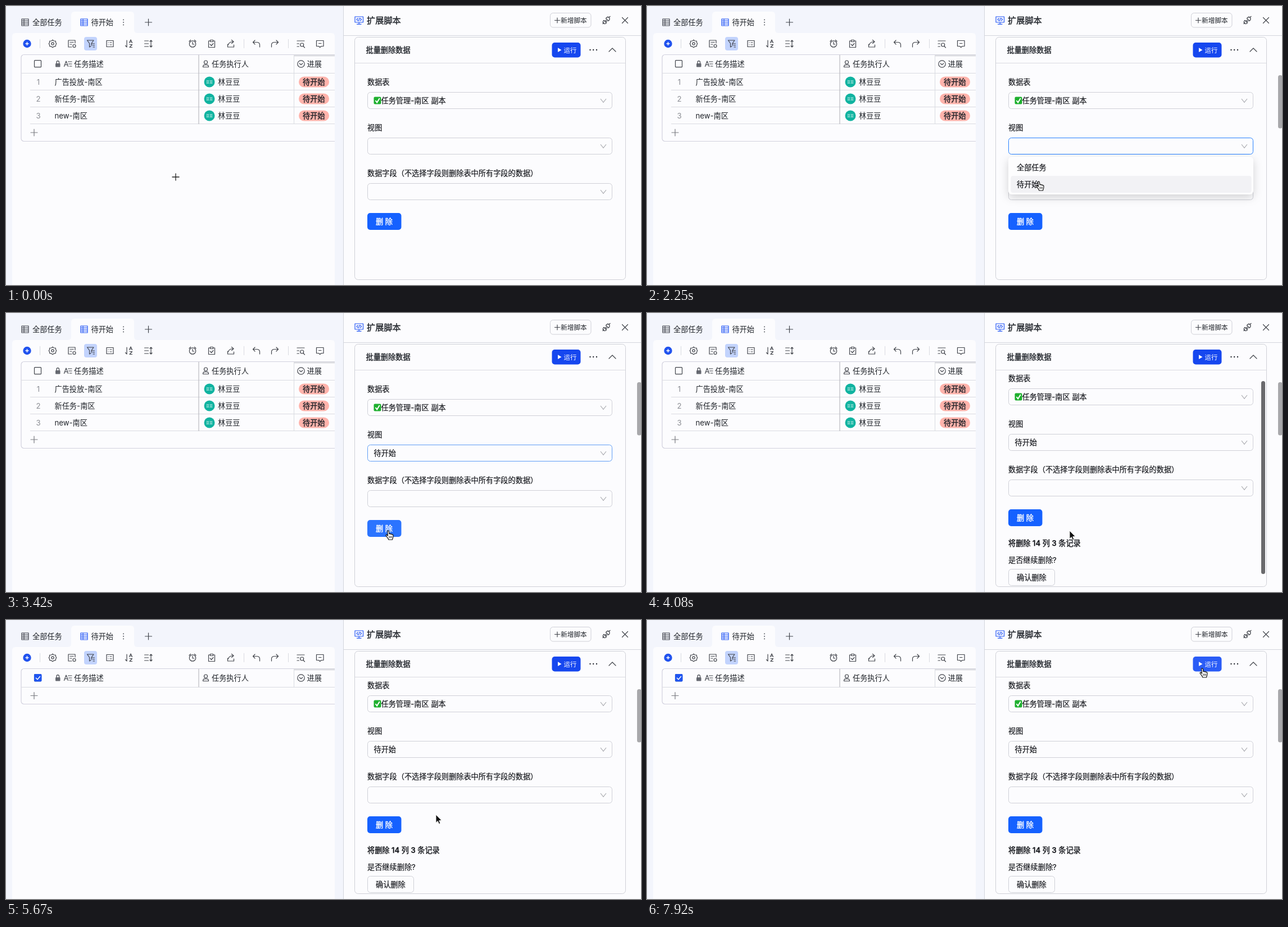
Write an HTML page that moves like this. It is 1130 px wide and 496 px high and loops after 8 s.

```html
<!DOCTYPE html>
<html lang="zh-CN">
<head>
<meta charset="utf-8">
<title>批量删除数据</title>
<style>
html, body { margin: 0; width: 100%; height: 100%; overflow: hidden; background: #f3f5fc; }
svg { display: block; }
text { font: 13.2px Inter, "Noto Sans CJK SC", "Noto Sans CJK JP", sans-serif; color: #1f2329; fill: currentColor; }
#form text, #menu text { color: #15171c; stroke: currentColor; stroke-width: .2; }
text.mid, #form text.mid { font-weight: 500; stroke: currentColor; stroke-width: .4; }
text.num { color: #8a8c93; text-anchor: middle; }
text.white, #form text.white { color: #fff; }
.icon { fill: none; stroke: #41444b; stroke-width: 1.2; stroke-linecap: round; stroke-linejoin: round; }
.blue { stroke: #2457f5; }
.line { fill: none; stroke: #dadbe1; }
.page { fill: #fcfcfe; }
.box { fill: #fcfcfe; stroke: #cfd0d7; }
.arrow { fill: none; stroke: #a6a7ad; stroke-width: 1.1; }
#menu { transform-origin: 861px 268px; filter: drop-shadow(0 5px 8px rgba(0,0,0,.17)); }
</style>
</head>
<body>
<svg width="1130" height="496" viewBox="0 0 1130 496">
  <defs>
    <clipPath id="bodyClip"><rect x="621" y="102" width="480" height="384"/></clipPath>
    <clipPath id="gridClip"><rect x="20" y="80" width="565" height="180"/></clipPath>
    <g id="sheet"><path d="M0 0H12V12H0ZM0 3H12M0 6H12M0 9H12M4 0V12"/></g>
    <g id="plus"><path d="M-6 0H6M0-6V6"/></g>
    <path id="down" d="M-5-3L0 3.4 5-3"/>
  </defs>

  <!-- left pane -->
  <rect width="600" height="496" fill="#f3f5fc"/>
  <path class="page" d="M11 496V54Q11 48 17 48H110Q116 48 116 42V16Q116 10 122 10H222Q228 10 228 16V42Q228 48 234 48H579Q585 48 585 54V496Z"/>
  <use href="#sheet" x="28" y="23" class="icon"/>
  <text x="47" y="34">全部任务</text>
  <use href="#sheet" x="133" y="23" class="icon blue"/>
  <text x="151.500" y="34">待开始</text>
  <g fill="#555860"><circle cx="209" cy="24.500" r="1"/><circle cx="209" cy="29" r="1"/><circle cx="209" cy="33.500" r="1"/></g>
  <use href="#plus" x="253.500" y="29" class="icon"/>

  <circle cx="37.500" cy="67" r="7.200" fill="#2052ee"/>
  <path d="M34.500 67H40.500M37.500 64V70" stroke="#fff" stroke-width="1.400"/>
  <path class="line" d="M60.500 59V75M423.500 59V75M502.500 59V75"/>
  <rect x="139" y="55" width="23" height="24" rx="4" fill="#c2d3fd"/>
  <g class="icon">
    <path d="M83 60.300L85 62 88.300 62.400 88.600 65.300 89.800 67 88.600 68.800 88.300 71.700 85 72.200 83 73.700 81 72.200 77.700 71.700 77.400 68.800 76.200 67 77.400 65.300 77.700 62.400 81 62Z"/>
    <circle cx="83" cy="67" r="2.200"/>
    <path d="M123 66V61H111V73H117M114 64.500H120M114 68H117"/><circle cx="121.500" cy="71" r="2.500"/>
    <path d="M144.500 61H156L152 66.500V70M144.500 61L148.500 66.500V73L151 71.500M153 67H157.500M154 70H157.500M155 73H157.500"/>
    <path d="M179 61.500H191V72.500H179ZM182 65H182.300M185 65H188M182 69H182.300M185 69H188"/>
    <path d="M215 61V73L212.500 70.500M219.500 65.500L222 60 224.500 65.500M220.300 64H223.700M220 68.500H224.500L220 73.500H224.500"/>
    <path d="M246.500 62H253.500M246.500 67H253.500M246.500 72H253.500M258 61V73M256 63L258 61 260 63M256 71L258 73 260 71"/>
    <circle cx="332" cy="67.500" r="5.700"/><path d="M332 64V68H335M326 63L328.500 60.500M338 63L335.500 60.500"/>
    <path d="M363 62H360.500V73.500H371.500V62H369M363.500 60.500H368.500V63.500H363.500ZM363 68L365.500 70.500 369 66.500"/>
    <path d="M394.500 68V73H405.500V69M395.500 69Q397 63.500 404.500 63.500M401.500 60.500L405 63.500 401.500 66.500"/>
    <path d="M443 61L439.500 64.500 443 68M440 64.500H447Q451.500 65 451.500 69V73"/>
    <path d="M481 61L484.500 64.500 481 68M484 64.500H477Q472.500 65 472.500 69V73"/>
    <path d="M518 62H531M518 67H521.500M518 72H521.500M529 71.500L531.500 74"/><circle cx="526.700" cy="69" r="3"/>
    <path d="M552.500 61.500H565V71.500H561L558.700 73.500 556.500 71.500H552.500ZM556.500 66.500H561"/>
  </g>

  <!-- grid -->
  <g clip-path="url(#gridClip)">
    <rect id="frame" x="27" y="86.500" width="580" height="154" rx="5" fill="#fcfcfe" stroke="#d2d1de" stroke-width="1.200"/>
    <path class="line" d="M27 119.500H585M512.500 87V119"/>
    <path d="M512 88H585" stroke="#dcdde1" stroke-width="3"/>
    <g id="rows"></g>
    <path id="freeze" d="M343 87V210" stroke="#b9babf" stroke-width="1.200"/>
    <use id="add" href="#plus" x="50" y="225" class="icon" stroke-opacity=".7"/>
    <rect x="50.500" y="96.700" width="12" height="12" rx="1" class="icon"/>
    <g id="checked"><rect x="50" y="96" width="13.500" height="13.500" rx="2" fill="#1f55f0"/><path d="M53 102.800L56 105.700 60.800 100" fill="none" stroke="#fff" stroke-width="1.500"/></g>
    <rect x="88" y="102" width="8.500" height="6.500" rx="1" fill="#666971"/>
    <path class="icon" d="M90 102V100Q90 97.700 92.200 97.700T94.500 100V102M103.500 107.500L107 98 110.500 107.500M105 104.500H109M110.500 99H117M111.500 103H117M113 107H117"/>
    <text x="121" y="108">任务描述</text>
    <g class="icon"><circle cx="355.500" cy="100" r="3"/><path d="M350.500 108.500Q350.500 104.700 354 104.700H357Q360.500 104.700 360.500 108.500Z"/><circle cx="525" cy="103" r="6.200"/><path d="M522.300 102L525 104.700 527.700 102"/></g>
    <text x="366" y="108">任务执行人</text>
    <text x="535.500" y="108">进展</text>
  </g>

  <!-- right pane -->
  <rect class="page" x="600" width="530" height="496"/>
  <path d="M600.500 0V496M601 52.500H1130" stroke="#d3d5dd"/>
  <path id="split" d="M602 0V496" stroke="#3370ff" stroke-width="2"/>
  <path class="icon blue" stroke-width="1.500" d="M621 19H635.500V29H621ZM628.200 29V32M624.500 32.300H632M626 22L624 24 626 26M630.500 22L632.500 24 630.500 26M629 21.500L627.600 26.500"/>
  <text x="642" y="31.200" class="mid" style="font-size:15.200px">扩展脚本</text>
  <rect class="box" x="968.500" y="12.500" width="72.500" height="25.500" rx="5"/>
  <path class="icon" d="M976.500 25.500H985.500M981 21V30"/>
  <text x="987" y="30" style="font-size:11.700px">新增脚本</text>
  <path class="icon" d="M1062 31.500L1064 29.500M1064 25.500L1068.500 30 1066.500 31.500Q1064.500 32 1063 30.300T1062.700 27ZM1067.500 22L1072 26.500 1073.500 25Q1075 22.500 1073 20.500T1069 20.500ZM1073 20.500L1075 18.500M1066 27L1068 25M1067.500 28.500L1069.500 26.500"/>
  <path class="icon" stroke-width="1.400" d="M1096.500 20.500L1106.500 30.500M1106.500 20.500L1096.500 30.500"/>

  <rect class="box" x="620.500" y="55.500" width="482" height="431" rx="6"/>
  <path class="line" d="M621 101.500H1102"/>
  <text x="640.500" y="83" class="mid">批量删除数据</text>
  <rect id="run" x="971.500" y="65" width="51" height="26.500" rx="5"/>
  <path d="M982 74.300L988.500 78.200 982 82Z" fill="#fff"/>
  <text x="992.500" y="82.500" class="white" style="font-size:11.400px">运行</text>
  <g fill="#2c2f36"><circle cx="1039.500" cy="78" r="1.200"/><circle cx="1045.200" cy="78" r="1.200"/><circle cx="1051" cy="78" r="1.200"/></g>
  <path class="icon" stroke-width="1.400" d="M1073 81L1079 75 1085 81"/>

  <g clip-path="url(#bodyClip)"><g id="form">
    <text x="643" y="139.500">数据表</text>
    <rect class="box" x="643.500" y="153.500" width="435" height="29" rx="5"/>
    <use href="#down" x="1063" y="168" class="arrow"/>
    <rect x="654.500" y="161.500" width="13" height="13" rx="2" fill="#1fb02f"/>
    <path d="M657.500 168L660.200 171.500 664.800 164" fill="none" stroke="#fff" stroke-width="2"/>
    <text x="667.500" y="173">任务管理-南区 副本</text>

    <text x="643" y="221">视图</text>
    <rect id="view" class="box" x="643.500" y="234.500" width="435" height="29" rx="5"/>
    <use href="#down" x="1063" y="249" class="arrow"/>
    <text id="value" x="654.500" y="254">待开始</text>

    <text x="643" y="302">数据字段（不选择字段则删除表中所有字段的数据）</text>
    <rect class="box" x="643.500" y="315.500" width="435" height="29" rx="5"/>
    <use href="#down" x="1063" y="330" class="arrow"/>

    <rect id="del" x="643" y="368" width="60.500" height="30" rx="5"/>
    <text x="658" y="388" class="white mid">删 除</text>

    <g id="result">
      <text x="643" y="433" class="mid">将删除 14 列 3 条记录</text>
      <text x="643" y="463">是否继续删除?</text>
      <rect id="okBox" class="box" x="643.500" y="474.500" width="82" height="29" rx="5"/>
      <text id="okText" x="658" y="494">确认删除</text>
    </g>
  </g></g>

  <rect id="innerBar" x="1093" y="121" width="7" height="343" rx="3.500" fill="#6a6a6d"/>
  <rect id="outerBar" x="1123" y="123" width="7.500" height="94.500" rx="3.500" fill="#a8a8ab"/>

  <g id="menu">
    <rect x="643" y="268" width="436" height="67" rx="6" fill="#fdfdfe"/>
    <rect id="hover" x="647.500" y="272" width="428" height="30" rx="4" fill="#f2f2f5"/>
    <text x="658" y="291.500">全部任务</text>
    <text x="658" y="322">待开始</text>
  </g>

  <g id="cursor">
    <path id="cross" d="M-6.500 0H6.500M0-6.500V6.500" stroke="#222" stroke-width="1.300"/>
    <path id="arrow" d="M0 0V14.500L3.300 11.400 5.500 16.600 7.900 15.600 5.800 10.500H10.300Z" fill="#111" stroke="#fff" stroke-width=".9"/>
    <g id="hand" stroke="#111" stroke-width="1.200" stroke-linejoin="round">
      <path fill="#fff" d="M-1.300 1.300C-1.300-.5 1.200-.5 1.400 1.300L2 6C2.400 4.800 4.200 5 4.400 6.400 5.200 5.400 6.700 5.800 6.800 7 7.600 6.300 9 6.900 9 8.200L8.800 11.500C8.700 13 7.800 13.600 7.600 16H.8C.5 14-1.500 12.400-3 9.800-5 7.700-3.200 6.500-1.800 7.800L-.5 9.200Z"/>
      <path fill="none" stroke-width=".9" d="M2 9.500V13M4.200 9.500V13M6.300 9.500V13"/>
    </g>
  </g>
</svg>
<script>
const $ = id => document.getElementById(id);
const TICK = 1000 / 12, TICKS = 96;

$('rows').innerHTML = ['广告投放-南区', '新任务-南区', 'new-南区'].map((name, i) => `
  <g transform="translate(0 ${i * 30})">
    <text class="num" x="57.5" y="139.8">${i + 1}</text>
    <text x="86.5" y="139.8">${name}</text>
    <circle cx="362" cy="135" r="9.5" fill="#10b3a0"/>
    <text class="white" x="362" y="137.2" text-anchor="middle" style="font-size:6px">豆豆</text>
    <text x="377" y="139.8">林豆豆</text>
    <rect x="521" y="125.5" width="54" height="19" rx="9.5" fill="#ffb3ab"/>
    <text class="mid" x="528" y="139.8">待开始</text>
    <path class="line" d="M43 149.5H585M512.5 119V149.5"/>
  </g>`).join('');

// tick, x, y, pointer shape
const path = [
  [0, 302, 304, 'cross'], [2, 302, 304, 'cross'], [3, 440, 286, 'cross'], [4, 620, 262, 'arrow'],
  [5, 715, 239, 'hand'], [7, 715, 239, 'hand'], [8, 719, 246, 'hand'], [11, 719, 246, 'hand'],
  [14, 731, 247, 'hand'], [22, 731, 247, 'hand'], [27, 697, 312, 'hand'], [34, 697, 312, 'hand'],
  [39, 682, 372, 'arrow'], [40, 680, 387, 'hand'], [44, 680, 387, 'hand'], [49, 752, 387, 'arrow'],
  [53, 705, 447, 'arrow'], [54, 690, 462, 'hand'], [64, 690, 462, 'hand'], [66, 765, 346, 'arrow'],
  [70, 765, 346, 'arrow'], [73, 600, 330, 'arrow'], [76, 360, 300, 'cross'], [79, 360, 300, 'cross'],
  [84, 580, 235, 'cross'], [85, 609, 220, 'arrow'], [87, 609, 220, 'arrow'], [93, 960, 100, 'arrow'],
  [94, 988, 86, 'hand'], [96, 988, 86, 'hand']
];

const ramp = (n, a, b) => Math.min(1, Math.max(0, (n - a) / (b - a)));
const within = (n, a, b) => n >= a && n < b;
const show = (id, on) => $(id).style.opacity = +on;
const set = (id, name, value) => $(id).setAttribute(name, value);

function moveCursor(n) {
  const i = path.findIndex(p => p[0] >= n);
  const to = path[i], from = path[Math.max(0, i - 1)];
  const k = to === from ? 0 : (n - from[0]) / (to[0] - from[0]);
  const [x, y] = [1, 2].map(j => Math.round(from[j] + (to[j] - from[j]) * k));
  set('cursor', 'transform', `translate(${x} ${y})`);
  for (const kind of ['cross', 'arrow', 'hand']) show(kind, kind === to[3]);
}

function draw(n) {
  moveCursor(n);

  // grid
  const empty = n >= 60;
  show('rows', !empty);
  show('checked', empty);
  set('frame', 'height', empty ? 63 : 154);
  set('freeze', 'd', empty ? 'M343 87V119' : 'M343 87V210');
  set('add', 'y', empty ? 134.5 : 225);

  // view select and its menu
  const open = ramp(n, 13, 16) * (1 - ramp(n, 30, 33));
  $('menu').style.opacity = open;
  $('menu').style.transform = `scaleY(${0.8 + 0.2 * open})`;
  set('hover', 'y', n < 26 ? 272 : 302);
  const focus = within(n, 14, 43);
  $('view').style.stroke = !focus ? '' : n < 38 ? '#2680ff' : '#5f9df5';
  show('value', n >= 30);

  // buttons, result, scrolling
  set('del', 'fill', within(n, 40, 46) ? '#2b74ff' : '#1561ff');
  set('run', 'fill', n >= 94 ? '#2a5cf6' : '#1647ef');
  const okColor = within(n, 54, 66) ? '#4096ff' : '';
  $('okBox').style.stroke = okColor;
  $('okText').style.color = okColor;
  show('result', n >= 43);
  set('form', 'transform', `translate(0 ${-19 * ramp(n, 44, 48)})`);
  show('innerBar', within(n, 45, 60));
  show('outerBar', within(n, 12, 75) || n >= 89);
  show('split', within(n, 85, 89));
}

const start = performance.now();
function loop() {
  const t = performance.now() - start;
  draw(Math.floor((t + 4) / TICK) % TICKS);
  requestAnimationFrame(loop);
}
loop();
</script>
</body>
</html>
```
